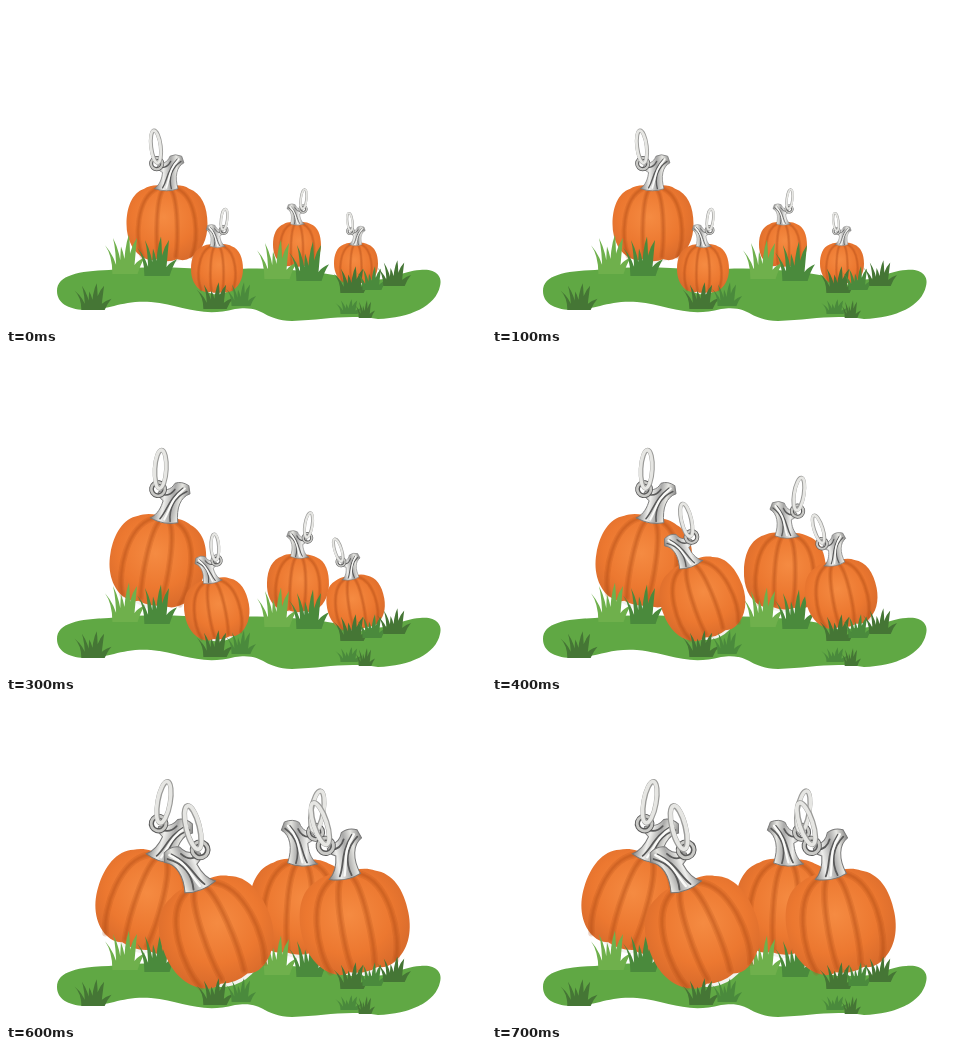
An HTML page for the animation above (2700 ms loop, 480x320 px).

```html
<!DOCTYPE html>
<html lang="en">
<head>
<meta charset="utf-8">
<title>Growing pumpkins</title>
<style>
html, body { margin: 0; width: 100%; height: 100%; overflow: hidden; background: #fff; }
svg { display: block; width: 480px; height: 320px; }
</style>
</head>
<body>
<svg id="stage" viewBox="0 0 480 320">
  <defs>
    <radialGradient id="skin" cx=".46" cy=".42" r=".6">
      <stop offset="0" stop-color="#f58b42"/>
      <stop offset=".65" stop-color="#ec7830"/>
      <stop offset="1" stop-color="#da6c2c"/>
    </radialGradient>
    <linearGradient id="silver">
      <stop offset="0" stop-color="#828281"/>
      <stop offset=".3" stop-color="#eeeeec"/>
      <stop offset=".55" stop-color="#a9a9a8"/>
      <stop offset=".75" stop-color="#e6e6e2"/>
      <stop offset="1" stop-color="#858584"/>
    </linearGradient>
    <!-- Body radius 55, centred on the origin, stem leaning right -->
    <g id="pumpkin" fill="none" stroke-linecap="round">
      <path d="M-38 38Q0 74 38 38Z" fill="#f3f2ef"/>
      <path fill="url(#skin)" d="M0-48C-12-53-24-50-31-46C-48-40-55-20-55 2C-55 24-45 42-30 49Q-22 53-14 50Q0 55 14 50Q24 53 32 48C47 40 55 23 55 2C55-22 47-40 30-46C22-51 10-52 0-48Z"/>
      <g id="ribs" stroke="#b04c18"></g>
      <path d="M-17-46C-9-52-7-60-6-68C-10-70-14-73-13-77C-5-82 0-80 4-90Q11-94 20-90L23-81C13-76 10-62 15-46Q0-40-17-46Z" fill="url(#silver)" stroke="#777"/>
      <path d="M-6-47C1-58-1-70 14-86M6-46C2-60 6-74 19-83M-10-75Q0-73 5-83" stroke="#5a5a5a" stroke-width="1.8"/>
      <path d="M-1-47C4-61 2-71 16-86" stroke="#fafaf8" stroke-width="2.4"/>
      <circle cx="-14" cy="-80" r="7.5" stroke="#595959" stroke-width="5.5"/>
      <circle cx="-14" cy="-80" r="7.8" stroke="#c9c9c6" stroke-width="3"/>
      <g transform="rotate(-7 -15 -103)">
        <ellipse cx="-15" cy="-103" rx="6.5" ry="22" stroke="#9b9b99" stroke-width="5.4"/>
        <ellipse cx="-15.5" cy="-103" rx="6.6" ry="22" stroke="#e6e6e3" stroke-width="3.8"/>
      </g>
    </g>
  </defs>
  <path fill="#60a844" d="M51 285C51 269 73 265 103 264C145 259 180 262 215 264C260 260 301 264 340 271C383 280 389 266 414 264C429 262 437 270 434 280C430 300 404 312 372 313C340 308 318 314 286 315C255 314 259 299 229 303C194 312 177 299 145 296C116 294 105 304 78 304C62 303 51 297 51 285Z"/>
</svg>
<script>
const stage = document.getElementById('stage');
const LIGHT = '#6fb04c', MID = '#4a8a3c', DARK = '#457635';
const STEP = 100, LOOP = 2700, TILT_PER_LEVEL = 10;

function add(tag, attributes, parent = stage) {
  const node = document.createElementNS('http://www.w3.org/2000/svg', tag);
  for (const [name, value] of Object.entries(attributes)) node.setAttribute(name, value);
  parent.append(node);
  return node;
}

const mix = (from, to, amount) => from + (to - from) * amount;
const clamp = (value, low, high) => Math.max(low, Math.min(high, value));

// Each rib is a wide soft shadow with a finer line in it
for (const u of [-.7, -.25, .25, .7]) {
  const d = `M${20 * u}-46C${60 * u}-32 ${62 * u} 22 ${48 * u} 46`;
  for (const width of [7, 4, 1.6]) {
    add('path', { d, 'stroke-width': width, 'stroke-opacity': .2 }, document.getElementById('ribs'));
  }
}

// Six blades rise from a narrow root and bend outwards
function tuft(x, y, fill, width = 40, height = 40) {
  let d = '';
  for (let i = 0; i < 6; i++) {
    const u = i / 2.5 - 1;
    const root = u * width * .24, thick = width * .075;
    const tipX = u * width / 2;
    const tipY = -height * (1 - .28 * u * u - (i % 3 === 2 ? .3 : 0));
    d += `M${root - thick} 0Q${root - thick} ${tipY * .65} ${tipX} ${tipY}` +
      `Q${root + thick * (1 + u)} ${tipY * .6} ${root + thick} 0Z`;
  }
  add('path', { d, fill, transform: `translate(${x} ${y})` });
}

function tallTufts(x, y) {
  tuft(x, y, LIGHT);
  tuft(x + 32, y + 2, MID);
}

function lowTufts(x, y, gap) {
  tuft(x, y, DARK, 37, 27);
  tuft(x + gap, y - 3, MID, 30, 24);
}

const pumpkins = [];

// x and foot run from first to last level; side -1 mirrors the stem
function pumpkin(options) {
  pumpkins.push({ node: add('use', { href: '#pumpkin' }), ...options });
}

pumpkin({ side: 1, first: 3, every: 2, radii: [40.5, 48, 52.5], x: [161, 143], foot: [257, 251], tilt: 17 });
tallTufts(119, 268);

pumpkin({ side: -1, first: 2, every: 2, radii: [24, 31, 41, 51], x: [291, 294], foot: [262, 255], tilt: 2 });
tallTufts(271, 273);

pumpkin({ side: -1, first: 3, every: 1, radii: [26, 32.5, 42, 56], x: [211, 210], foot: [288, 285], tilt: -21 });
lowTufts(209, 303, 26);

pumpkin({ side: 1, first: 2, every: 2, radii: [22, 29, 36, 54.5], x: [350, 348.5], foot: [279, 273.5], tilt: -11 });
lowTufts(346, 287, 20);

tuft(388, 280, DARK, 34, 26);
tuft(87, 304, DARK, 37, 27);
tuft(343, 308, MID, 27, 15);
tuft(359, 312, DARK, 20, 18);

function draw(time) {
  const step = Math.floor(time % LOOP / STEP);
  for (const { node, side, first, every, radii, x, foot, tilt } of pumpkins) {
    const last = radii.length - 1;
    const level = clamp(Math.floor((step - first) / every) + 1, 0, last);
    const radius = radii[level], scale = radius / 55;
    const centreX = mix(...x, level / last);
    const centreY = mix(...foot, level / last) - radius;
    const angle = Math.sign(tilt) * Math.min(Math.abs(tilt), TILT_PER_LEVEL * level);
    node.setAttribute('transform',
      `translate(${centreX} ${centreY}) rotate(${angle}) scale(${side * scale} ${scale})`);
  }
}

const start = performance.now();
function tick() {
  draw(performance.now() - start);
  requestAnimationFrame(tick);
}
tick();
</script>
</body>
</html>
```
